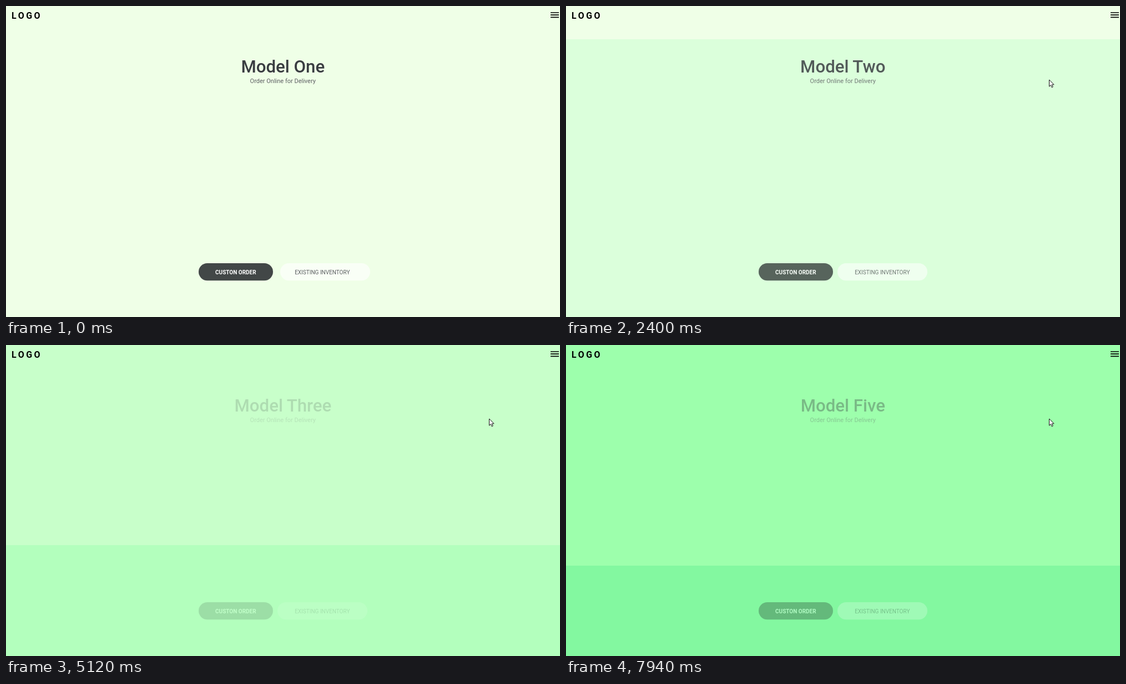
Write an HTML page that moves like this. It is 998x561 px and loops after 8000 ms.

```html
<!DOCTYPE html>
<html lang="en">
<head>
<meta charset="utf-8">
<title>Models</title>
<style>
  html, body { margin: 0; width: 100%; height: 100%; overflow: hidden; background: #efffe7; }
  svg { display: block; width: 998px; height: 561px; font-family: Roboto, Arial, sans-serif; }
  .mid { text-anchor: middle; }
  .title { font-size: 31.2px; font-weight: 500; fill: #393c41; }
  .sub { font-size: 11px; fill: #5c5e62; }
  .btn { font-size: 10px; }
  .bold { font-weight: 700; fill: #fff; }
  .soft { fill: #5c5e62; }
  .logo { font-size: 16px; font-weight: 700; letter-spacing: 3.5px; }
</style>
</head>
<body>
<svg id="stage" viewBox="0 0 998 561" xmlns="http://www.w3.org/2000/svg">
  <g id="pages"></g>
  <g id="overlays"></g>
  <text class="logo" x="10" y="23">LOGO</text>
  <path transform="translate(981 11.2) scale(.833)" d="M0 0h18v2H0zM0 5h18v2H0zM0 10h18v2H0z"/>
  <path id="cursor" d="M.5 .5v12.2l2.8-2.6 1.9 4.3 2-.9-1.9-4.1h3.8z" fill="#fff" stroke="#111"/>
</svg>
<script>
const W = 998, H = 561, LOOP = 8000, STEP = 100, PAUSE = 400;
const colors = ['#efffe7', '#dbffdb', '#c8ffca', '#b3ffbd', '#9dffac', '#83f8a0'];
const names = ['One', 'Two', 'Three', 'Four', 'Five'];

// Wheel turns: start and length in ms, share of a page scrolled before it snaps on
const turns = [
  { start: 1500, ms: 400, reach: .44 },
  { start: 3110, ms: 600, reach: .557 },
  { start: 4820, ms: 300, reach: .356 },
  { start: 6230, ms: 300, reach: .356 },
  { start: 7740, ms: 300, reach: .356 }
];

const $ = id => document.getElementById(id);
const clamp = v => Math.max(0, Math.min(1, v));

$('pages').innerHTML = colors
  .map(c => `<rect width="${W}" height="${H}" fill="${c}"/>`).join('');

const pill = (x, w, fill, alpha) =>
  `<rect x="${x}" y="464" width="${w}" height="31.2" rx="15.6" fill="${fill}" fill-opacity="${alpha}"/>`;
const label = (cls, x, y, text) => `<text class="mid ${cls}" x="${x}" y="${y}">${text}</text>`;

$('overlays').innerHTML = names.map((name, i) => `<g>
  ${label('title', 498.8, 120, 'Model ' + name)}
  ${label('sub', 498.8, 139, 'Order Online for Delivery')}
  ${pill(347, 134, '#171a20', .8)}
  ${label('btn bold', 413.8, 483.5, 'CUSTON ORDER')}
  ${pill(i ? 489 : 494, 162, '#fff', .65)}
  ${label('btn soft', 569.8, 483.5, 'EXISTING INVENTORY')}
</g>`).join('');

const pages = [...$('pages').children];
const overlays = [...$('overlays').children];

// Ease-out progress from 0 to 1, advancing once per STEP
function glide(t, start, ms, power) {
  if (t < start) return 0;
  const held = Math.floor((t - start) / STEP) * STEP + STEP / 2;
  return 1 - (1 - clamp(held / (ms + STEP / 2))) ** power;
}

function turned(t, { start, ms, reach }) {
  const snapMs = reach > .4 ? 200 : 300;
  return reach * glide(t, start, ms, 1.35)
    + (1 - reach) * glide(t, start + ms + PAUSE, snapMs, 1.8);
}

function draw(t) {
  const pos = turns.reduce((sum, turn) => sum + turned(t, turn), 0);
  pages.forEach((page, i) => page.setAttribute('y', Math.round((i - pos) * H)));
  // fully visible within 5% of a page, gone at 42%
  overlays.forEach((o, i) => o.setAttribute('opacity', clamp((.42 - Math.abs(pos - i)) / .37)));
  const away = 1 - glide(t, 1100, 300, 1.8);
  $('cursor').setAttribute('transform', `translate(${870 + 140 * away} ${132.5 + 30 * away})`);
}

const start = performance.now();
function tick() {
  draw((performance.now() - start) % LOOP);
  requestAnimationFrame(tick);
}
draw(0);
requestAnimationFrame(tick);
</script>
</body>
</html>
```
